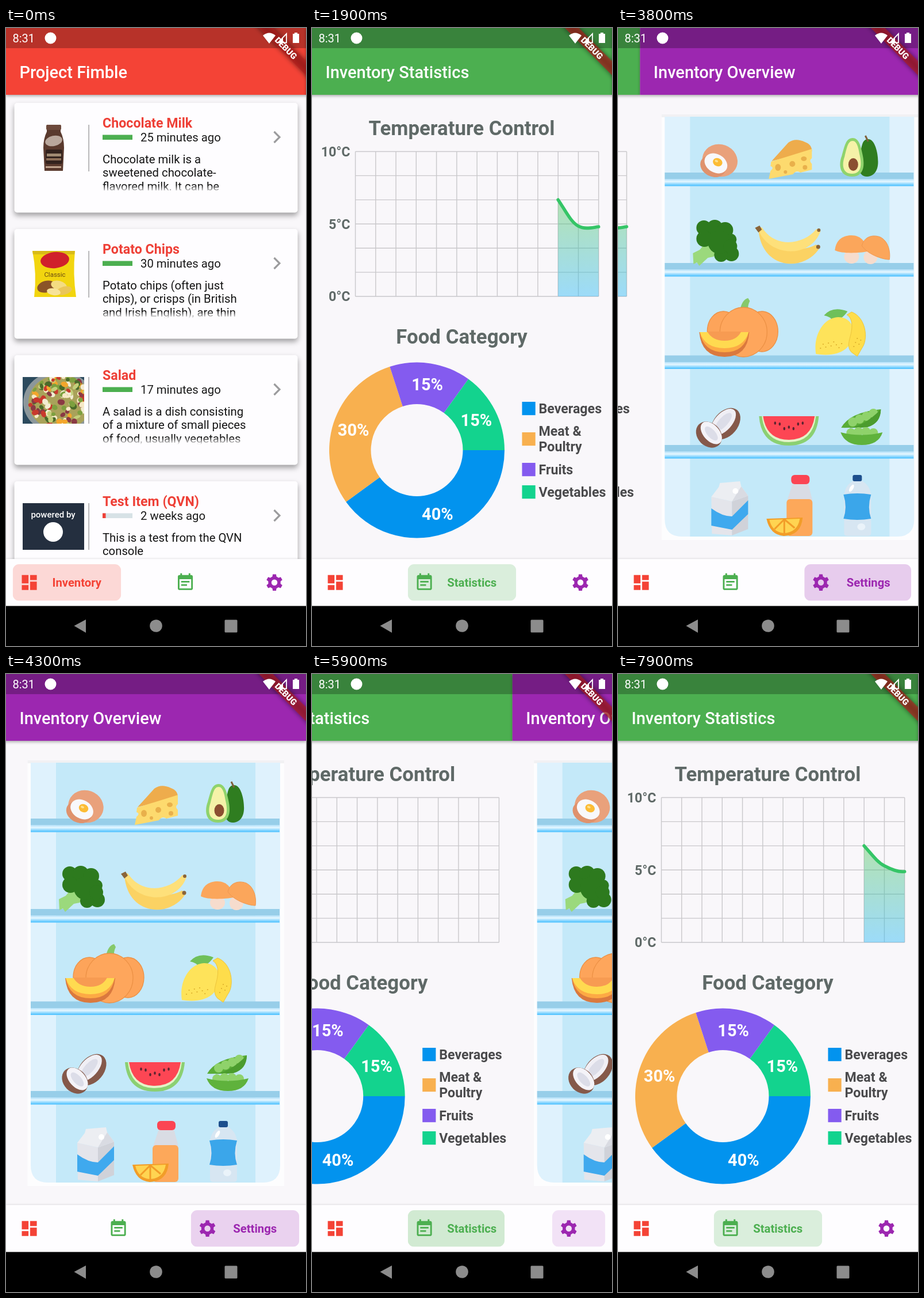
An HTML page for the animation above (8000 ms loop, 522x1073 px).

```html
<!DOCTYPE html>
<html lang="en">
<head>
<meta charset="utf-8">
<title>Pantry app</title>
<style>
html, body { margin: 0; width: 100%; height: 100%; overflow: hidden; background: #f9f7fa; }
svg { display: block; }
#stage { width: 100vw; height: 100vh; font-family: Roboto, sans-serif; }
text { white-space: pre; }
.bar { filter: drop-shadow(0 2px 2.5px rgba(0,0,0,.32)); }
.card { fill: #fefdff; filter: drop-shadow(0 5px 5px rgba(0,0,0,.36)); }
.b { font-weight: 700; }
</style>
</head>
<body>
<svg id="stage" viewBox="0 0 522 1073">
  <defs>
    <linearGradient id="fade" x2="0" y2="1"><stop stop-color="#fefdff" stop-opacity="0"/><stop offset="1" stop-color="#fefdff"/></linearGradient>
    <linearGradient id="area" x2="0" y2="1"><stop stop-color="#5cc85c" stop-opacity=".45"/><stop offset="1" stop-color="#2bb9f8" stop-opacity=".45"/></linearGradient>
    <linearGradient id="glass" x2="0" y2="1"><stop stop-color="#b5e2fb"/><stop offset=".35" stop-color="#e6f7ff"/><stop offset="1" stop-color="#44beff"/></linearGradient>
  </defs>
  <g id="pages"></g>
  <g id="nav"></g>
  <g id="system"></g>
</svg>
<script>
const LOOP = 8000, W = 522;
const RED = '#f44336', GREEN = '#4caf50', PURPLE = '#9c27b0';
const $ = id => document.getElementById(id);

// Shape helpers
const rect = (x, y, w, h, fill, rx = 0, more = '') =>
  `<rect x="${x}" y="${y}" width="${w}" height="${h}" rx="${rx}" fill="${fill}" ${more}/>`;
const oval = (x, y, rx, ry, fill, turn = 0, more = '') =>
  `<ellipse cx="${x}" cy="${y}" rx="${rx}" ry="${ry}" fill="${fill}" transform="rotate(${turn} ${x} ${y})" ${more}/>`;
const dot = (x, y, r, fill) => oval(x, y, r, r, fill);
const path = (d, fill, more = '') => `<path d="${d}" fill="${fill}" ${more}/>`;
const line = (d, color, width, more = '') =>
  path(d, 'none', `stroke="${color}" stroke-width="${width}" ${more}`);
const text = (x, y, size, s, fill, more = '') =>
  `<text x="${x}" y="${y}" font-size="${size}" fill="${fill}" ${more}>${s}</text>`;
const bold = (x, y, size, s, fill, anchor = 'start') =>
  text(x, y, size, s, fill, `class="b" text-anchor="${anchor}"`);
const times = (n, f) => Array.from({ length: n }, (_, i) => f(i)).join('');

const appBar = (title, color) =>
  rect(0, 0, W, 116, color, 0, 'class="bar"') + text(23.5, 86.5, 29, title, '#fff', 'font-weight="500"');

// Inventory page; pictures are drawn relative to the top of their card
const milk = () =>
  path('M71 38H95V50Q101 62 101 78L99 118H67L65 78Q65 62 71 50Z', '#5a3a2e') +
  rect(70, 38, 26, 9, '#6d4a3c', 2) + oval(83, 66, 15, 9, '#b9a79c', -12) +
  rect(69, 81, 29, 25, '#33231e', 3) + rect(71, 88, 25, 5, '#a08a72') + rect(70, 96, 26, 4, '#8d6e58') +
  rect(69, 110, 27, 3, '#c1a58f');
const chips = () =>
  path('M46 38H120Q116 78 122 118H49Q54 78 46 38Z', '#f2d50f') +
  path('M46 38H120L119 44H47Z', '#d9bb18') + oval(85, 54, 25, 14, '#d0202b', -6) +
  text(85, 83, 11.5, 'Classic', '#6b4a12', 'text-anchor="middle"') +
  oval(70, 100, 16, 10, '#8a5427', -15) + oval(92, 98, 14, 8, '#f4dc82', 15) +
  oval(101, 107, 14, 7, '#eac65a', -15) + oval(83, 109, 12, 6, '#f7e39a', 8);
const salad = () => {
  let seed = 7;
  const rnd = () => (seed = seed * 16807 % 2147483647) / 2147483647;
  const tones = ['#7da03f', '#c8392d', '#f2ecd2', '#f3a62c', '#c3cf7a', '#8a3a44', '#4a6b2a', '#f6e9c6'];
  return `<svg x="29" y="38" width="107" height="81">` + rect(0, 0, 107, 81, '#2c4a5e') +
    oval(63, 44, 62, 54, '#8c979b') + oval(65, 44, 55, 48, '#a9a25a') +
    times(130, i => {
      const a = rnd() * 6.283, r = Math.sqrt(rnd());
      return oval(65 + 52 * r * Math.cos(a), 43 + 44 * r * Math.sin(a), 3 + rnd() * 4, 2.5 + rnd() * 3, tones[i % 8], rnd() * 180);
    }) + '</svg>';
};
const cloud = () =>
  rect(29, 38, 107, 81, '#242f3f') +
  text(82, 63, 15, 'powered by', '#fff', 'font-weight="500" text-anchor="middle"') + dot(82, 88, 17, '#fff');

const items = [
  ['Chocolate Milk', '25 minutes ago', milk, ['Chocolate milk is a', 'sweetened chocolate-', 'flavored milk. It can be']],
  ['Potato Chips', '30 minutes ago', chips, ['Potato chips (often just', 'chips), or crisps (in British', 'and Irish English), are thin']],
  ['Salad', '17 minutes ago', salad, ['A salad is a dish consisting', 'of a mixture of small pieces', 'of food, usually vegetables']],
  ['Test Item (QVN)', '2 weeks ago', cloud, ['This is a test from the QVN', 'console']]
];
const card = ([name, age, picture, lines], i) =>
  `<g transform="translate(0 ${130 + 219 * i})">` + rect(14.5, 0, 493, 190.5, '#fefdff', 5, 'class="card"') +
  picture() + rect(143.5, 38, 1.2, 81, '#8b8b8d') + bold(168, 42.5, 23.2, name, '#ee4037') +
  rect(168, 55.5, 52, 8.5, i < 3 ? GREEN : '#d7e2e6') + (i < 3 ? '' : rect(168, 55.5, 5.5, 8.5, '#ee4037')) +
  text(234, 67, 20.3, age, '#1a1a1a') +
  lines.map((s, k) => text(168, 105 + 23.3 * k, 20.3, s, '#141414')).join('') +
  rect(160, 143, 300, 12, 'url(#fade)') + rect(160, 155, 300, 8, '#fefdff') +
  line('M466.5 50L476 59.5L466.5 69', '#9c9c9e', 3.2) + '</g>';
const inventory = () => items.map(card).join('') + appBar('Project Fimble', RED);

// Statistics page
const INK = '#5f6967';
const slices = [[.4, '#0293ee'], [.3, '#f8b04f'], [.15, '#845bef'], [.15, '#13d38e']];
const donut = () => {
  const at = (r, f) => `${182.5 + r * Math.cos(f * 2 * Math.PI)} ${733 + r * Math.sin(f * 2 * Math.PI)}`;
  let from = 0;
  return slices.map(([part, color]) => {
    const to = from + part, [x, y] = at(116, from + part / 2).split(' ');
    const d = `M${at(152.5, from)}A152.5 152.5 0 0 1 ${at(152.5, to)}L${at(80, to)}A80 80 0 0 0 ${at(80, from)}Z`;
    from = to;
    return path(d, color) + bold(x, +y + 10.5, 29, Math.round(part * 100) + '%', '#fff', 'middle');
  }).join('');
};
const legend = () =>
  [[649, ['Beverages']], [702, ['Meat &amp;', 'Poultry']], [755, ['Fruits']], [794, ['Vegetables']]].map(([y, words], i) =>
    rect(365.5, y, 23.2, 23.2, slices[i][1]) +
    words.map((s, k) => bold(394.5, y + 19.5 + (words.length - 1) * (27.2 * k - 13.6), 23.2, s, '#4a4a4c')).join('')).join('');
const stats = () =>
  bold(260.5, 186, 34.8, 'Temperature Control', INK, 'middle') +
  line(times(13, i => `M${75.5 + 35.27 * i} 214.5V466`) + times(7, i => `M75.5 ${214.5 + 41.92 * i}H498.7`), '#c9c8cb', 1.4) +
  ['10°C', '5°C', '0°C'].map((s, i) => bold(66.5, 222.7 + 125.8 * i, 23.2, s, INK, 'end')).join('') +
  '<g id="curve"><path id="fill" fill="url(#area)"/>' +
  '<path id="trace" fill="none" stroke="#35c567" stroke-width="5.6" stroke-linecap="round"/></g>' +
  bold(260.5, 547.5, 34.8, 'Food Category', INK, 'middle') + donut() + legend() +
  appBar('Inventory Statistics', GREEN);

// Overview page
const shelf = y => rect(43, y, 433, 11.5, '#97cee9') + rect(43, y + 11.5, 433, 12, 'url(#glass)');
const eggs = () =>
  oval(139, 230, 31, 28, '#e9a17b', 20) + oval(127, 240, 23, 18, '#df926d', 25) +
  oval(132, 235, 21, 16, '#f8f8fb', 30) + oval(135, 233, 8.5, 7, '#fcbc35', 25) + oval(133, 231, 3, 2, '#fde08c', 25);
const cheese = () =>
  path('M229 231L258 199Q270 190 287 198Q299 202 299 214Z', '#eeac4c') +
  path('M228 232L299 210V226Q293 230 299 236V246L279 251Q272 246 266 254L224 262L227 248Q234 242 227 240Z', '#fdda6e') +
  oval(240, 242, 5, 6, '#e9b04b') + oval(265, 236, 5, 5, '#e9b04b') + oval(285, 227, 5, 4, '#e9b04b') +
  dot(287, 242, 4, '#e9b04b') + dot(253, 250, 3, '#e9b04b');
const avocado = () =>
  path('M397 193C410 193 415 222 414 236C413 252 403 258 395 258C380 258 378 240 382 225C386 205 386 193 397 193Z', '#2f7d20') +
  line('M392 187L397 197', '#80603b', 3) +
  path('M370 191C380 191 384 203 387 219C391 236 391 258 369 258C347 258 345 237 351 222C356 205 358 191 370 191Z', '#8fd36c') +
  path('M370 196C377 196 380 207 382 220C386 236 386 253 369 253C352 253 351 237 356 223C360 207 362 196 370 196Z', '#f5f2a8') +
  oval(371, 237, 8.5, 11, '#8b4f31');
const broccoli = () =>
  path('M92 391L104 385L120 365L142 386L128 397L118 399L103 413L99 407L93 410Z', '#9bd97c') +
  [[111, 347, 13], [130, 347, 14], [148, 351, 14], [158, 367, 10], [159, 392, 13], [141, 394, 12], [112, 366, 14], [138, 372, 20], [157, 379, 12]]
    .map(c => dot(...c, '#2d7a1e')).join('');
const bananas = () =>
  path('M206 350C210 398 245 414 275 408Q300 402 313 381L306 376C290 386 250 392 212 350Z', '#fbd263') +
  path('M205 348C222 398 296 402 314 353L307 349C285 376 236 384 212 346Z', '#fee07a') +
  path('M200 347L208 343L212 350L206 355Z', '#8a6439') + dot(311, 351, 3, '#8a6439') + dot(310, 380, 3.5, '#8a6439');
const mushrooms = () =>
  oval(368, 397, 13, 12, '#f6dccd') + oval(401, 398, 12, 12, '#f6dccd') +
  path('M339 386C341 366 355 360 368 360C385 360 393 372 396 388C380 391 350 392 339 386Z', '#fba65b') +
  path('M386 378C390 362 405 358 418 363C432 370 436 388 434 402C420 402 395 392 386 378Z', '#fba65b', 'stroke="#ee9750"');
const pumpkin = () => {
  const edge = 'stroke="#ec9145" stroke-width="1.3"';
  return path('M174 489Q178 471 188 469L191 474Q187 482 188 490Z', '#86c96b') +
    oval(145, 526, 28, 34, '#fda45a', 0, edge) + oval(212, 527, 28, 35, '#fda45a', 0, edge) + oval(180, 528, 41, 43, '#fea65c', 0, edge) +
    path('M103 528H190Q187 571 147 571Q107 571 103 528Z', '#da793e') +
    path('M104 528H189Q183 563 147 563Q110 563 104 528Z', '#fdaa44') +
    path('M104 528H189Q180 556 147 556Q113 556 104 528Z', '#ffda50') +
    path('M117 527H176Q168 543 147 543Q126 543 117 527Z', '#f79b52');
};
const lemons = () =>
  path('M320 499Q335 482 361 492Q350 508 335 509Q332 501 320 499Z', '#6fc05a') +
  path('M306 566C301 535 318 503 345 502C362 502 373 515 371 532C368 558 345 572 306 566Z', '#fee35a') +
  path('M368 493C393 502 398 540 386 556L378 570L368 563C358 552 366 540 368 525C370 512 367 502 360 498Z', '#fedd4b', 'stroke="#edc43b"') +
  times(9, i => dot(314 + i * 4.6, 556 - (i * 7) % 12, 1.1, '#dcae2c') + (i < 5 ? dot(372 + i * 3, 553 - i * 7 % 17, 1.1, '#dcae2c') : ''));
const coconut = () =>
  oval(149, 687, 31, 21, '#85594a', -50) + oval(145, 684, 28, 15, '#f0eff5', -48) + oval(145, 684, 20, 8, '#dcdde8', -48) +
  oval(120, 706, 25, 20, '#85594a', 45) + oval(124, 703, 23, 14, '#f4f3f8', 48) + oval(124, 704, 15, 7, '#dcdde8', 48);
const melon = () =>
  path('M207 674H311Q307 725 259 725Q211 725 207 674Z', '#8bd072') + path('M212 674H306Q301 719 259 719Q217 719 212 674Z', '#e3f3c8') +
  path('M214 674H304Q298 715 259 715Q220 715 214 674Z', '#fd4654') +
  times(7, i => oval(235 + i * 8, 686 + 11 * Math.sin(i * Math.PI / 6) - (i % 2) * 4, 1.8, 2.8, '#5b2430'));
const peas = () =>
  path('M350 694Q365 667 419 662Q417 692 386 694Z', '#59ad37') + times(4, i => dot(370 + i * 12, 684 - i * 5, 8, '#8fd26b')) +
  path('M352 695Q385 697 419 662Q419 686 396 693Z', '#4b9c2e') +
  times(4, i => dot(367 + i * 13, 703 - (i % 3 ? 2 : 0), 8, '#8fd26b')) +
  path('M349 702Q385 711 422 702Q415 724 386 724Q357 724 349 702Z', '#5fb23c');
const carton = () =>
  path('M124 814L160 822V881L125 878Z', '#e4e5eb') + path('M160 822L188 812V870L160 881Z', '#d0d2d9') +
  path('M124 814L137 797L139 790L174 787L176 796L188 812L160 822Z', '#eceef2') + path('M176 796L188 812L160 822Z', '#d9dbe2') +
  path('M124 834Q143 848 160 848L188 820V844L160 871L124 864Z', '#3fa9ee') + dot(166, 804, 5, '#fff');
const juice = () =>
  path('M266 790H292L300 820H256Z', '#d9dce4') + rect(263, 776, 32, 16, '#fb4553', 6) + rect(255, 818, 45, 64, '#fda85a', 6) +
  path('M220 852L283 850Q280 881 250 882Q226 880 220 852Z', '#f29d28') + path('M225 854L278 852Q274 876 250 877Q230 875 225 854Z', '#ffd451') +
  line('M251 853L234 870M251 853V877M251 853L269 868', '#f29d28', 3);
const water = () =>
  path('M371 786H386Q401 795 402 812V876Q402 882 396 882H361Q355 882 355 876V812Q356 795 371 786Z', '#d7e6f2') +
  rect(370, 776, 16, 11, '#1d4f8d', 3) + path('M354 810Q378 806 402 810Q395 832 402 852Q378 856 354 852Q361 832 354 810Z', '#3ba6ea') +
  oval(368, 799, 3, 7, '#fff', 30) + oval(385, 866, 7, 6, '#eaf3fa');
const overview = () =>
  rect(37.5, 150, 446.5, 739, '#fdfdfe') + rect(37.5, 150, 446.5, 5, '#f1f1f3') +
  path('M43 154H477V853Q477 883 447 883H73Q43 883 43 853Z', '#dff2fd') + rect(87, 154, 347, 729, '#c4e9f9') +
  [251, 408, 568.5, 724].map(shelf).join('') +
  [eggs, cheese, avocado, broccoli, bananas, mushrooms, pumpkin, lemons, coconut, melon, peas, carton, juice, water].map(f => f()).join('') +
  appBar('Inventory Overview', PURPLE);

// Bottom tabs
const gear = times(6, i => path('M10 2.2H14L14.8 7H9.2Z', PURPLE, `transform="rotate(${60 * i} 12 12)"`)) +
  '<circle cx="12" cy="12" r="5.5" fill="none" stroke="#9c27b0" stroke-width="3.8"/>';
const tabs = [
  ['Inventory', RED, path('M3 13h8V3H3zm0 8h8v-6H3zm10 0h8V11h-8zm0-18v6h8V3z', RED)],
  ['Statistics', GREEN, path('M17 10H7v2h10zm2-7h-1V1h-2v2H8V1H6v2H5c-1.1 0-2 .9-2 2v14c0 1.1.9 2 2 2h14c1.1 0 2-.9 2-2V5c0-1.1-.9-2-2-2zm0 16H5V8h14zm-5-5H7v2h7z', GREEN)],
  ['Settings', PURPLE, gear]
];

$('pages').innerHTML = [inventory, stats, overview].map((f, i) => `<g transform="translate(${W * i} 0)">${f()}</g>`).join('');
$('nav').innerHTML = rect(0, 922, W, 82, '#fefdff', 0, 'style="filter:drop-shadow(0 -1px 1.5px rgba(0,0,0,.1))"') +
  tabs.map(([name, color, icon], i) =>
    `<svg id="tab${i}" y="931" height="63.5">` + `<rect id="pill${i}" width="100%" height="63.5" rx="11" fill="${color}"/>` +
    `<g transform="translate(11.4 14.4) scale(1.45)">${icon}</g>` +
    `<g id="label${i}">${bold(111.5, 39, 20.3, name, color, 'middle')}</g></svg>`).join('');
$('system').innerHTML =
  rect(0, 0, W, 35, 'rgba(0,0,0,.25)') +
  `<g transform="translate(${W} 0) rotate(45)">` +
  rect(-70, 40.6, 140, 17.4, 'rgba(183,28,28,.63)', 0, 'style="filter:drop-shadow(0 0 4.5px rgba(0,0,0,.8))"') +
  text(0, 54.6, 14.8, 'DEBUG', '#fff', 'font-weight="900" text-anchor="middle"') + '</g>' +
  text(11.5, 25, 20, '8:31', '#fff') + dot(77.5, 17.5, 10, '#fff') +
  path('M458 27L447 13Q458 4 469 13Z', '#fff') +
  line('M488 10V25.5H473Z', '#fff', 1.8) + path('M482 17V26H473Z', '#fff') +
  path('M502 8H507V10H510V26H499V10H502Z', '#fff') +
  rect(0, 1003.5, W, 70, '#000') + path('M118.5 1038L139 1027V1050Z', '#8c8c8c') +
  dot(261, 1038, 10.8, '#8c8c8c') + rect(380.5, 1027.5, 22, 22, '#8c8c8c', 1.5);

// Each tap: start, time of the first painted step, tabs left and entered
const taps = [[724, 905, 0, 1], [3440, 3440, 1, 2], [5680, 5680, 2, 1]];
const SPAN = 500, LAG = 26;
const clamp = x => Math.max(0, Math.min(1, x));

// cubic-bezier(.25, .1, .25, 1)
function ease(x) {
  let lo = 0, hi = 1;
  const bez = (a, b, s) => 3 * a * s * (1 - s) ** 2 + 3 * b * s * s * (1 - s) + s ** 3;
  for (let i = 0; i < 24; i++) {
    const mid = (lo + hi) / 2;
    if (bez(.25, .25, mid) < x) lo = mid; else hi = mid;
  }
  return bez(.1, 1, lo);
}

function drawCurve(t) {
  const first = t < 5680;
  $('curve').style.display = t > (first ? 1600 : 6700) ? '' : 'none';
  const [m, e] = first ? [344, 345] : [333, 343];
  const d = `M428.2 298.3C440 ${298 + (m - 298) * .37} 450 ${m - 7} 463.5 ${m}C475 ${m + 6} 487 ${e + 1.5} 498.7 ${e}`;
  $('trace').setAttribute('d', d);
  $('fill').setAttribute('d', d + 'V466H428.2Z');
}

function draw(t) {
  const [start, , from, to] = taps.filter(k => t >= k[1]).pop() || [0, 0, 0, 0];
  const u = clamp((t - start) / SPAN);
  const page = from + (to - from) * ease(clamp((t - start - LAG) / SPAN));
  $('pages').setAttribute('transform', `translate(${-W * page} 0)`);
  const open = 1 - (1 - u) ** 3;
  let x = 11.75;
  tabs.forEach((_, i) => {
    const still = from === to && i === to;
    const size = still ? 1 : i === to ? open : i === from ? 1 - open : 0;
    const tint = still ? .2 : i === to ? .2 + .1 * (1 - u) : i === from ? .2 * Math.max(0, 1 - 2 * u * u) : 0;
    const label = still ? 1 : i === to ? clamp(u * 2.5) : i === from ? clamp(1 - 3 * u) : 0;
    const width = 72 + 116.5 * size;
    $('tab' + i).setAttribute('x', x);
    $('tab' + i).setAttribute('width', width);
    $('pill' + i).setAttribute('fill-opacity', tint);
    $('label' + i).setAttribute('opacity', label);
    x += width + 83;
  });
  drawCurve(t);
}

const began = performance.now();
function tick() {
  draw((performance.now() - began) % LOOP);
  requestAnimationFrame(tick);
}
tick();
</script>
</body>
</html>
```
